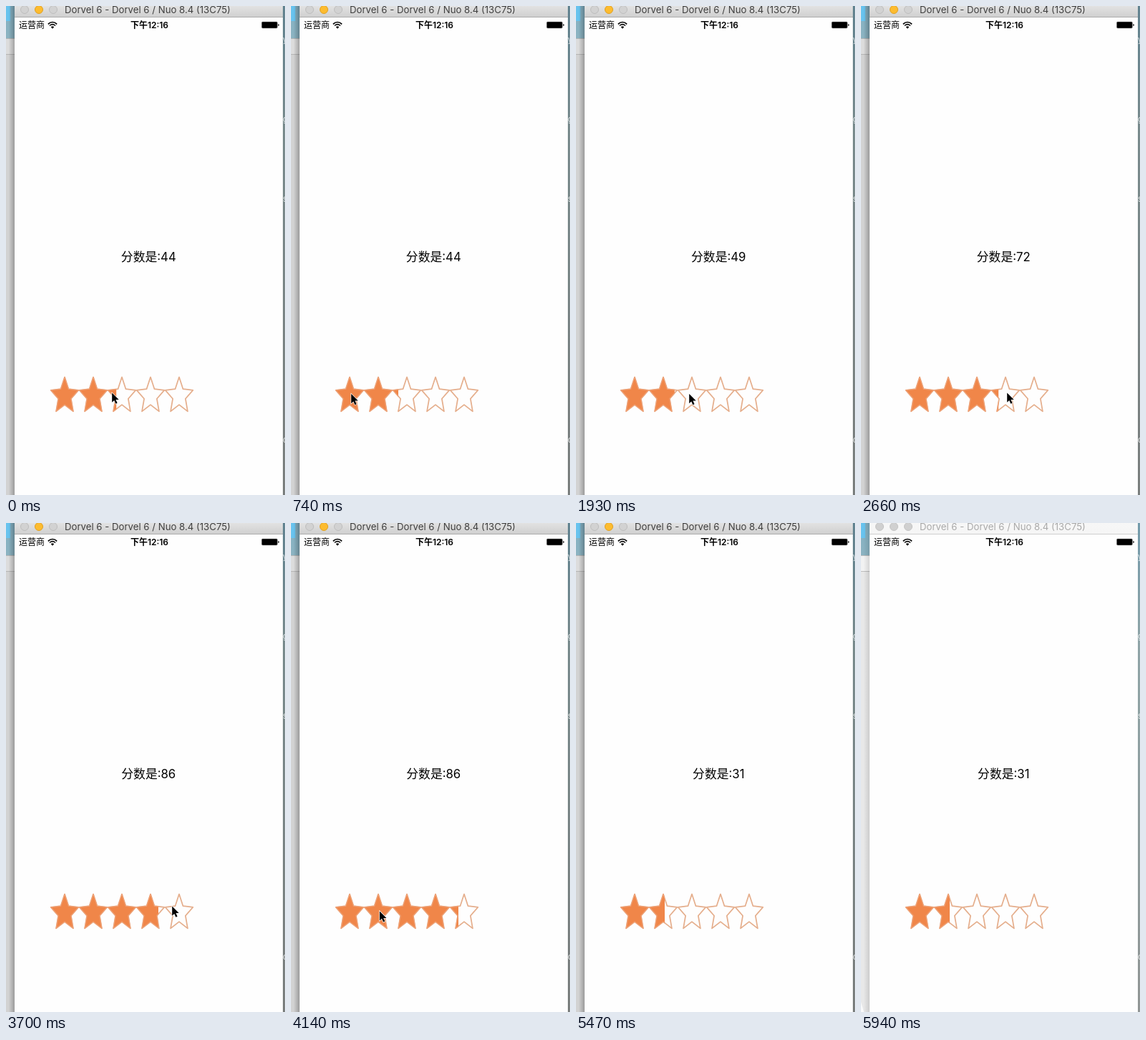
An HTML page for the animation above (5960 ms loop, 390 by 682 pixels).

```html
<!DOCTYPE html>
<html lang="zh">
<head>
<meta charset="utf-8">
<title>Star rating</title>
<style>
  html, body { margin: 0; width: 100%; height: 100%; overflow: hidden; background: #fefefe; }
  svg {
    display: block; width: 390px; height: 682px;
    font-family: Inter, "Noto Sans CJK SC", "Noto Sans CJK", sans-serif;
    --bar-top: #e2e2e2; --bar-end: #d0d0d0; --bar-line: #adadad;
    --title: #3f3f3f; --light: #d2d2d2; --light-rim: #bdbdbd;
    --middle: #fdbc2f; --middle-rim: #dfa023;
    --back: #d2d2d2; --tool: #dcdcdc; --shade: .26;
  }
  svg.idle {
    --bar-top: #f7f7f7; --bar-end: #f5f5f5; --bar-line: #cfcfcf;
    --title: #a9a9a9; --light: #d0d0d0; --light-rim: #c4c4c4;
    --middle: #d0d0d0; --middle-rim: #c4c4c4;
    --back: #e8e8e8; --tool: #f2f2f2; --shade: .12;
  }
  .corner { visibility: hidden; }
  .idle .corner { visibility: visible; }
  .line, .full { stroke-linejoin: round; }
  .line { fill: none; stroke: #e5ae8c; stroke-width: 1.7; }
  .full { fill: #f08649; stroke: #efa074; stroke-width: 1.3; }
</style>
</head>
<body>
<svg id="stage" viewBox="0 0 390 682">
  <defs>
    <linearGradient id="bar" x2="0" y2="1">
      <stop style="stop-color:var(--bar-top)"/>
      <stop offset="1" style="stop-color:var(--bar-end)"/>
    </linearGradient>
    <linearGradient id="desk" x2="0" y2="1">
      <stop stop-color="#83b0c2"/>
      <stop offset=".25" stop-color="#a3bbbe"/>
      <stop offset="1" stop-color="#a4aaa9"/>
    </linearGradient>
    <linearGradient id="shadow">
      <stop offset=".3" stop-opacity="0"/>
      <stop offset="1" style="stop-opacity:var(--shade)"/>
    </linearGradient>
    <clipPath id="wedge"><path d="M65 31.5 53 19.5H77Z"/></clipPath>
    <clipPath id="filled"><rect id="fill" x="60" y="510" width="0" height="62"/></clipPath>
    <g id="row"></g>
  </defs>

  <!-- desktop and the window behind -->
  <rect width="390" height="682" fill="url(#desk)"/>
  <rect width="6" height="21" fill="#68c3ee"/>
  <rect y="45" width="12" height="637" style="fill:var(--back)"/>
  <rect y="46" width="12" height="21" style="fill:var(--tool)"/>
  <path d="M0 45.5H12M0 67.5H12" stroke="#aaa" stroke-opacity=".7"/>
  <path class="corner" d="M0 668 4 682H0Z" fill="#fafafa"/>
  <rect width="12" height="682" fill="url(#shadow)"/>
  <rect x="387" width="3" height="682" style="opacity:var(--shade)"/>
  <g fill="#fff" fill-opacity=".8" font-size="11">
    <text x="387" y="51">y</text>
    <text x="387" y="162">g</text>
    <text x="387" y="273">s</text>
    <text x="387" y="609">o</text>
  </g>

  <!-- simulator window -->
  <rect x="12" width="375" height="682" fill="#fefefe"/>
  <rect x="12" width="375" height="15" fill="url(#bar)"/>
  <rect x="12" y="15" width="375" height="1" style="fill:var(--bar-line)"/>
  <g style="fill:var(--light);stroke:var(--light-rim)">
    <circle cx="26" cy="5" r="5.5"/>
    <circle cx="46" cy="5" r="5.5" style="fill:var(--middle);stroke:var(--middle-rim)"/>
    <circle cx="66" cy="5" r="5.5"/>
  </g>
  <text x="82" y="10" font-size="13.2" style="fill:var(--title)">Dorvel 6 - Dorvel 6 / Nuo 8.4 (13C75)</text>

  <!-- status bar -->
  <text x="18" y="30.6" font-size="12">运营商</text>
  <g clip-path="url(#wedge)" fill="none" stroke="#000" stroke-width="1.7">
    <circle cx="65" cy="30.5" r="1.5" fill="#000"/>
    <circle cx="65" cy="30.5" r="4.9"/>
    <circle cx="65" cy="30.5" r="8"/>
  </g>
  <text x="200.5" y="30.5" font-size="12" font-weight="600" text-anchor="middle">下午12:16</text>
  <rect x="357.4" y="22" width="22" height="9" rx="1.4" stroke="#999" stroke-width=".5"/>
  <path d="M380.4 25Q381.8 25.2 381.8 26.5T380.4 28Z"/>

  <text id="label" x="199.3" y="355.6" font-size="16.8" text-anchor="middle"></text>

  <use href="#row" class="line"/>
  <use href="#row" class="full" clip-path="url(#filled)"/>

  <path id="cursor" d="M0 0V13.2L3 10.4 5.2 15.2 7.4 14.2 5.3 9.5H9.5Z"
    stroke="#fff" stroke-width="1.3" paint-order="stroke"/>
</svg>
<script>
const LOOP = 5960, IDLE = 5940, TICK = 148, LEFT = 62;
const el = id => document.getElementById(id);
const stage = el('stage'), label = el('label'), fill = el('fill'), cursor = el('cursor');

// Five-pointed star, taller than wide
const star = 'M' + Array.from({ length: 10 }, (_, i) => {
  const r = i % 2 ? 0.46 : 1, a = i * Math.PI / 5;
  return [20.3 * r * Math.sin(a), -26.4 * r * Math.cos(a)].map(v => v.toFixed(2));
}).join('L') + 'Z';
for (let i = 0; i < 5; i++) {
  const x = LEFT + 20 + 40 * i;
  el('row').innerHTML += `<path d="${star}" transform="translate(${x} 544)"/>`;
}

// Each tap sets the score; the pointer then glides to the next one.
// share: part of the way the fill has come on the first tick
const taps = [
  { tick: 0, score: 44, y: 539.5, glide: 5 },
  { tick: 7, score: 12, y: 541, glide: 4 },
  { tick: 13, score: 49, y: 541, glide: 2 },
  { tick: 18, score: 72, y: 539.5, glide: 5 },
  { tick: 25, score: 86, y: 534.5, glide: 4, share: 0.25 },
  { tick: 32, score: 31, y: 541.5, glide: 5 }
];
const OPENING = 51;
const EXIT = { x: 366, y: 690 };

const edge = score => LEFT + 2 * score;
const mix = (a, b, k) => a + (b - a) * k;
const easeOut = k => 1 - (1 - k) ** 3;
const spot = tap => tap ? { x: edge(tap.score) - 1.8, y: tap.y } : EXIT;

function draw(t) {
  const tick = Math.floor((t + 8) / TICK);
  const n = taps.findLastIndex(tap => tap.tick <= tick);
  const tap = taps[n], age = tick - tap.tick;
  const before = n ? taps[n - 1].score : OPENING;
  const done = age ? 1 : tap.share ?? 0.7;
  const k = easeOut(Math.min(1, age / tap.glide));
  const a = spot(tap), b = spot(taps[n + 1]);

  label.textContent = '分数是:' + tap.score;
  fill.setAttribute('width', mix(edge(before), edge(tap.score), done) - 60);
  cursor.setAttribute('transform', `translate(${mix(a.x, b.x, k)} ${mix(a.y, b.y, k)})`);
  stage.classList.toggle('idle', t >= IDLE);
}

const start = performance.now();
function frame() {
  draw((performance.now() - start) % LOOP);
  requestAnimationFrame(frame);
}
frame();
</script>
</body>
</html>
```
